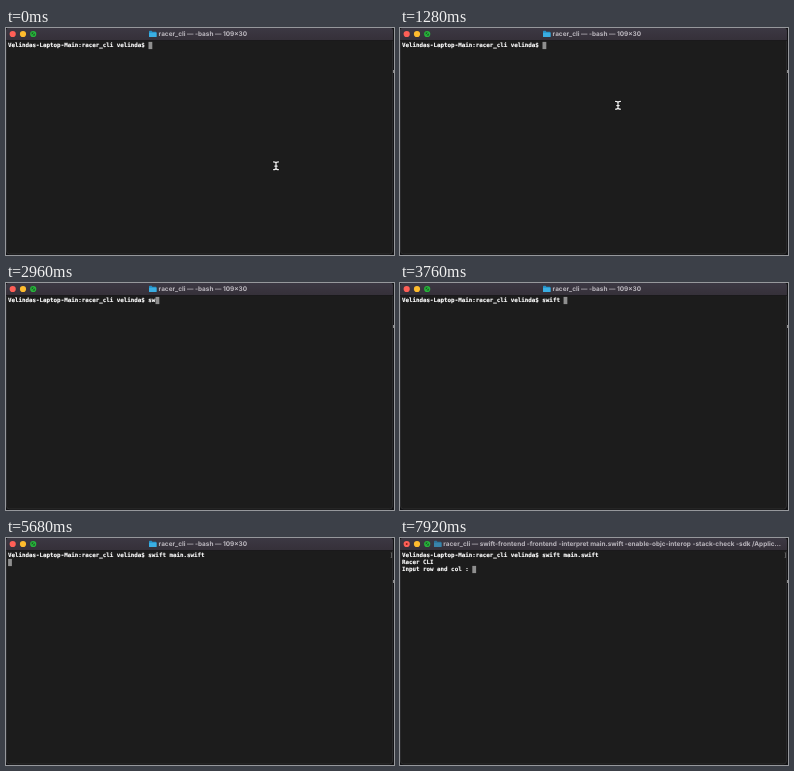
These frames come from a looping animation (388 by 227 pixels, 8 s). An HTML page:

```html
<!DOCTYPE html>
<html lang="en">
<head>
<meta charset="utf-8">
<title>Terminal</title>
<style>
  html, body { margin: 0; width: 100%; height: 100%; overflow: hidden; background: #1c1c1c; }
  svg { display: block; width: 388px; height: 227px; }
  text { white-space: pre; text-rendering: geometricPrecision; }
  .mono { font: bold 5.83px "DejaVu Sans Mono", monospace; fill: #fff; stroke: #fff; stroke-width: 0.14px; }
  .title { font: 700 6.45px Inter, sans-serif; fill: #bcb8bf; }
</style>
</head>
<body>
<svg viewBox="0 0 388 227">
  <defs>
    <linearGradient id="bar" x2="0" y2="1">
      <stop offset="0" stop-color="#3c3843"/>
      <stop offset="1" stop-color="#353039"/>
    </linearGradient>
  </defs>
  <rect width="388" height="227" fill="#111113"/>
  <rect x="0.5" y="0" width="386" height="226" rx="3" fill="#1c1c1c" stroke="#3a3a3c" stroke-width="0.6"/>
  <path d="M0 12.5V3Q0 0 3 0H384Q387 0 387 3V12.5Z" fill="url(#bar)"/>
  <rect y="12" width="387" height="0.6" fill="#111"/>
  <rect x="387" y="42" width="1" height="3" fill="#8a8a8a"/>

  <circle cx="6.7" cy="6" r="3.1" fill="#ff5f57"/>
  <circle id="dot" cx="6.7" cy="6" r="1" fill="#8a1f18"/>
  <circle cx="17" cy="6" r="3.1" fill="#febc2e"/>
  <circle cx="27.2" cy="6" r="3.1" fill="#28b53c"/>
  <path d="M25.7 4.5h2.2l-2.2 2.2zM28.7 7.5h-2.2l2.2-2.2z" fill="#12521c"/>

  <g id="folder">
    <path d="M0 .7Q0 0 .7 0H2.6L3.4 .9H6.8Q7.5 .9 7.5 1.6V5.6Q7.5 6.3 6.8 6.3H.7Q0 6.3 0 5.6Z" fill="#2590c6"/>
    <path d="M0 2H7.5V5.6Q7.5 6.3 6.8 6.3H.7Q0 6.3 0 5.6Z" fill="#3aaee2"/>
  </g>
  <text id="title" class="title" y="8.3"></text>

  <rect id="block" width="3.8" height="7.2" fill="#8f8f8f"/>
  <text id="line0" class="mono" x="2" y="19.4"></text>
  <text id="line1" class="mono" x="2" y="26.4"></text>
  <text id="line2" class="mono" x="2" y="33.4"></text>
  <text id="mark" class="mono" x="383.8" y="19.4" style="fill:#777;stroke:none">]</text>

  <g id="mouse" fill="none" stroke-linecap="round">
    <path id="halo" stroke="#111" stroke-width="2.2"/>
    <path id="beam" stroke="#f2f2f2" stroke-width="1.2"/>
  </g>
</svg>
<script>
const LOOP = 8000, STEP = 80, CHAR = 3.51, ROW = 7;
const PROMPT = 'Velindas-Laptop-Main:racer_cli velinda$ ';
const COMMAND = 'swift main.swift';
const ASK = 'Input row and col : ';
const BUSY = 'racer_cli — swift-frontend -frontend -interpret main.swift ' +
  '-enable-objc-interop -stack-check -sdk /Applic…';
const BEAM = 'M-2.4-3.6Q0-3.6 0-2.2Q0-3.6 2.4-3.6M0-2.2V2.8' +
  'M-2.4 4.2Q0 4.2 0 2.8Q0 4.2 2.4 4.2M-1.2 .6H1.2';
const ENTER = 5280, RENAME = 6160, OUTPUT = 6880;
const $ = id => document.getElementById(id);
const show = (id, on) => $(id).setAttribute('visibility', on ? 'visible' : 'hidden');
const place = (id, x, y) => $(id).setAttribute('transform', `translate(${x} ${y})`);
const setText = (id, s) => { if ($(id).textContent !== s) $(id).textContent = s; };

// The first word is typed slower than the file name.
const typed = t => t < 3840
  ? Math.max(0, Math.min(6, Math.floor((t - 2800) / 160) + 1))
  : Math.min(COMMAND.length, 6 + Math.floor((t - 3840) / 120));

function drawMouse(t) {
  const p = Math.max(0, Math.min(1, (t - 400) / 880));
  const e = p * p * (3 - 2 * p);
  place('mouse', 270 - 52 * e, 137.5 - 60.5 * e);
  show('mouse', t < 1600);
}

function drawTitle(t) {
  const busy = t >= RENAME;
  setText('title', busy ? BUSY : 'racer_cli — -bash — 109×30');
  $('title').setAttribute('x', busy ? 43.3 : 152.6);
  place('folder', busy ? 34 : 143, 2.8);
  $('folder').setAttribute('opacity', busy ? 0.65 : 1);
  show('dot', busy);
}

function draw(time) {
  const t = Math.floor((time % LOOP) / STEP) * STEP;
  const n = typed(t), done = t >= OUTPUT, entered = t >= ENTER;
  setText('line0', PROMPT + COMMAND.slice(0, n));
  setText('line1', done ? 'Racer CLI' : '');
  setText('line2', done ? ASK : '');
  const row = done ? 2 : entered ? 1 : 0;
  const col = done ? ASK.length : entered ? 0 : PROMPT.length + n;
  place('block', 2.1 + col * CHAR, 13.9 + row * ROW);
  show('mark', entered);
  drawTitle(t);
  drawMouse(t);
}

for (const id of ['halo', 'beam']) $(id).setAttribute('d', BEAM);
const start = performance.now();
function tick(now) {
  draw(Math.max(0, now - start));
  requestAnimationFrame(tick);
}
draw(0);
requestAnimationFrame(tick);
</script>
</body>
</html>
```
